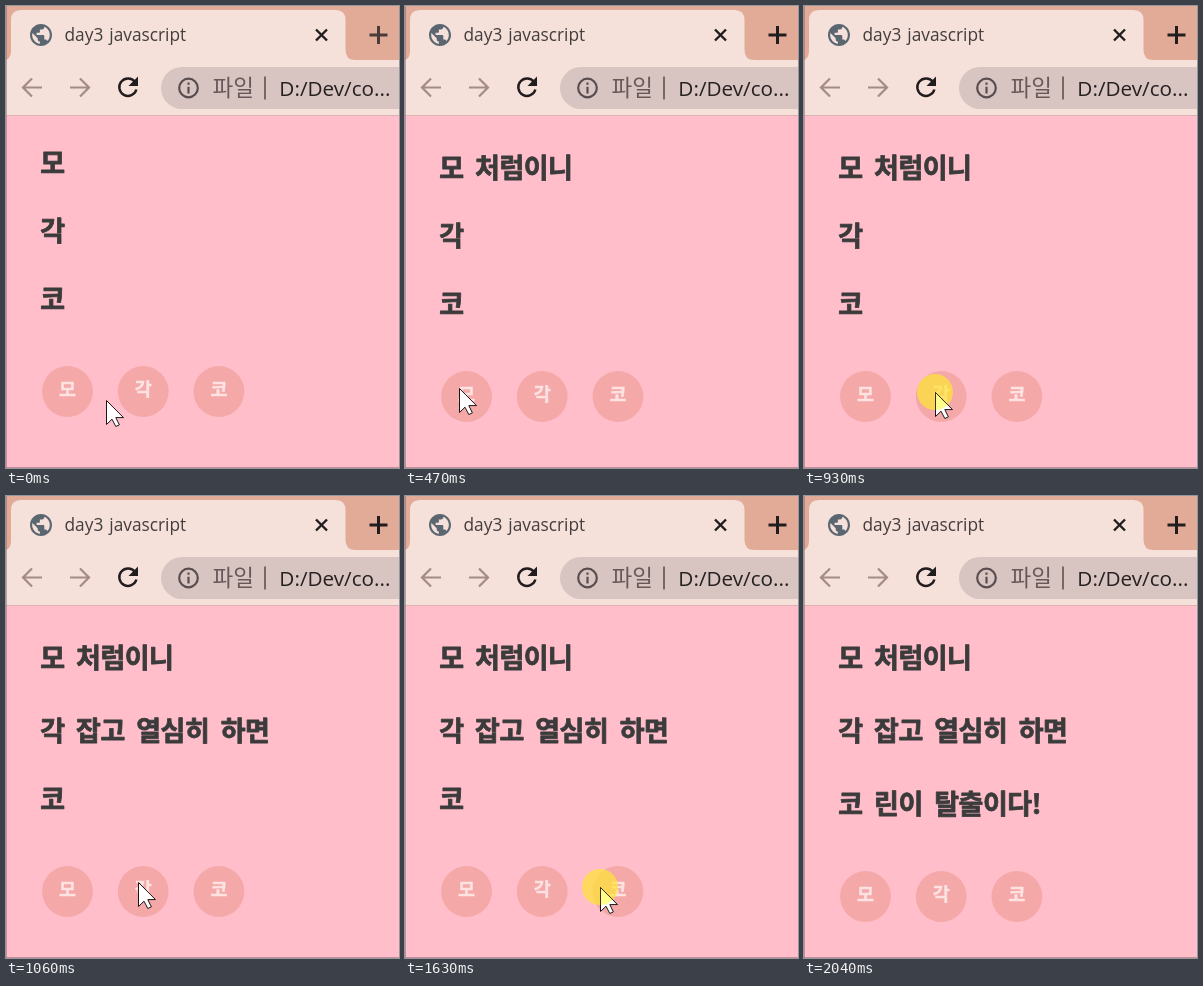
Write an HTML page that moves like this. It is 393 px wide and 462 px high and loops after 2.44 s.

```html
<!DOCTYPE html>
<html lang="ko">
<head>
<meta charset="utf-8">
<title>day3 javascript</title>
<style>
  html, body { margin: 0; width: 100%; height: 100%; overflow: hidden; background: #ffbeca; }
  svg { display: block; width: 100%; height: 100%; }
  .ui { font-family: "Open Sans", "Noto Sans", sans-serif; }
  .ko { font-family: "Noto Sans CJK KR", "Noto Sans CJK", sans-serif; }
  .line {
    font-size: 27px; font-weight: 700; letter-spacing: -.5px; word-spacing: 4.4px;
    fill: #3b3b3b; stroke: #3b3b3b; stroke-width: .8; stroke-linejoin: round;
  }
  .label {
    font-size: 18.5px; font-weight: 700; text-anchor: middle;
    fill: #fde3e2; stroke: #fde3e2; stroke-width: .4; stroke-linejoin: round;
  }
  .icon { fill: none; stroke: #211c1d; stroke-width: 2.4; }
  #plus { stroke-width: 3; }
  .nav { stroke: #a58b87; stroke-width: 2.2; }
  .info { stroke: #5a4d4f; stroke-width: 2.2; }
</style>
</head>
<body>
<svg viewBox="0 0 393 462" xmlns="http://www.w3.org/2000/svg">
  <defs>
    <path id="arrow" d="M.5 .5V24.500L6 19.200L9.800 26.500L13.400 24.900L9.800 17.600H17.500Z"/>
    <clipPath id="inGlow"><circle r="18"/></clipPath>
  </defs>

  <!-- tab strip -->
  <rect width="393" height="56" fill="#e2ab98"/>
  <path d="M0 54Q5 52 5 45V14Q5 4 15 4H329.500Q339.500 4 339.500 14V44Q339.500 54 349.500 54H393V109H0Z" fill="#f5e0da"/>
  <path transform="translate(21.800 15.800) scale(1.100)" fill="#5b6770" d="M12 2C6.480 2 2 6.480 2 12s4.480 10 10 10 10-4.480 10-10S17.520 2 12 2zm-1 17.930c-3.950-.490-7-3.850-7-7.930 0-.620.080-1.210.210-1.790L9 15v1c0 1.100.900 2 2 2zm6.900-2.540c-.260-.810-1-1.390-1.900-1.390h-1v-3c0-.550-.450-1-1-1H8v-2h2c.550 0 1-.450 1-1V7h2c1.100 0 2-.900 2-2v-.410c2.930 1.190 5 4.060 5 7.410 0 2.080-.800 3.970-2.100 5.390z"/>
  <text class="ui" x="58.500" y="35" font-size="17.3" word-spacing="1.5" fill="#433d3d">day3 javascript</text>
  <path class="icon" d="M310 23.500L321 34.500M321 23.500L310 34.500"/>
  <path id="plus" class="icon" d="M372.500 20V38M363.500 29H381.500"/>

  <!-- toolbar -->
  <path class="icon nav" d="M36 81.500H17.500M26 72.500L17 81.500L26 90.500"/>
  <path class="icon nav" d="M64 81.500H82.500M74 72.500L83 81.500L74 90.500"/>
  <path class="icon" d="M129 76A8.700 8.700 0 1 0 130.400 83.500"/>
  <path d="M132 70.500V80H122.500Z" fill="#211c1d"/>
  <path d="M393 61H176A21 21 0 0 0 176 103H393Z" fill="#d8c4c0"/>
  <circle class="icon info" cx="182.500" cy="82" r="9.300"/>
  <path d="M181.400 76.500H183.600V78.700H181.400ZM181.400 80.700H183.600V87.500H181.400Z" fill="#5a4d4f"/>
  <text class="ko" x="206.500" y="90" font-size="22.5" font-weight="300" fill="#67595a">파일</text>
  <path d="M259 70.500V93.500" stroke="#75686a" stroke-width="2"/>
  <text class="ui" x="273.300" y="90" font-size="20.7" fill="#262021">D:/Dev/co...</text>

  <!-- page -->
  <rect y="109" width="393" height="353" fill="#ffbeca"/>
  <path d="M0 109.500H393" stroke="#dcb1b1"/>
  <path d="M.5 0V462M0 461.500H393" stroke="#8a5f66" stroke-opacity=".5"/>
  <g id="lines"></g>
  <g id="buttons"></g>
  <g id="pointer">
    <circle id="glow" r="18" fill="#ffe632" fill-opacity=".7"/>
    <use href="#arrow" fill="#fff" stroke="#1c1618"/>
    <g id="tint" clip-path="url(#inGlow)"><use href="#arrow" fill="#ffff8c" stroke="#3a3218"/></g>
  </g>
</svg>
<script>
  const LOOP = 2440;
  const NS = "http://www.w3.org/2000/svg";
  const $ = id => document.getElementById(id);

  // Each click shows a glow, then opens its line.
  const rows = [
    { short: "모", full: "모 처럼이니", click: 330, open: 400 },
    { short: "각", full: "각 잡고 열심히 하면", click: 930, open: 1060 },
    { short: "코", full: "코 린이 탈출이다!", click: 1630, open: 1680 }
  ];

  // Pointer holds: time, x, y
  const holds = [
    [0, 100, 394], [60, 62, 386], [130, 42, 381],
    [470, 54, 382], [540, 87, 384], [600, 119, 386], [670, 131, 386],
    [1060, 132, 386], [1130, 137, 387], [1200, 154, 389], [1270, 176, 391],
    [1340, 189, 391], [1410, 194, 391], [1480, 195, 391],
    [1830, 204, 396], [1900, 252, 419], [1970, 345, 452], [2040, 500, 520]
  ];

  function add(parent, tag, attrs, text = "") {
    const el = document.createElementNS(NS, tag);
    for (const key in attrs) el.setAttribute(key, attrs[key]);
    el.textContent = text;
    return parent.appendChild(el);
  }

  rows.forEach((row, i) => {
    row.line = add($("lines"), "text", { class: "ko line", x: 34.3 });
    const cx = 61.5 + i * 75.7;
    add($("buttons"), "circle", { cx, cy: 385.5, r: 25.4, fill: "#f4a9a8" });
    add($("buttons"), "text", { class: "ko label", x: cx, y: 390 }, row.short);
  });

  function draw(t) {
    let shift = 0;
    rows.forEach((row, i) => {
      const open = t >= row.open;
      if (open) shift += 5;
      const text = open ? row.full : row.short;
      if (row.line.textContent !== text) row.line.textContent = text;
      row.line.setAttribute("y", 167.3 + i * 67.7 + shift);
    });
    $("buttons").setAttribute("transform", `translate(0 ${shift})`);

    const [, x, y] = holds.findLast(hold => t >= hold[0]);
    $("pointer").setAttribute("transform", `translate(${x} ${y})`);
    const pressed = rows.some(row => t >= row.click && t < row.open);
    $("glow").style.display = $("tint").style.display = pressed ? "" : "none";
    $("plus").style.stroke = t < 330 ? "#493d3c" : "#211c1d";
  }

  const start = performance.now();
  function tick() {
    draw((performance.now() - start) % LOOP);
    requestAnimationFrame(tick);
  }
  tick();
</script>
</body>
</html>
```
